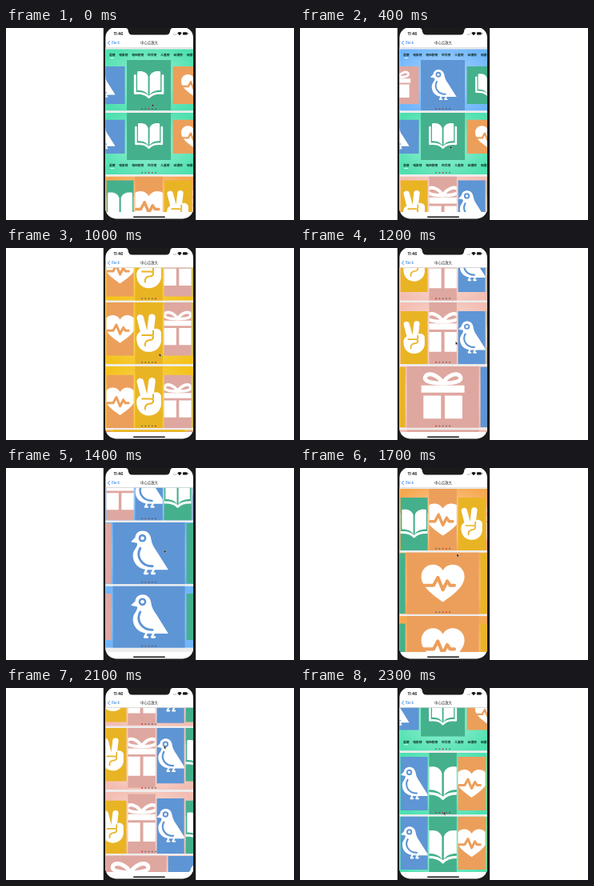
Animation, 360 px wide and 240 px high, one loop 2.4 s. Source, as an HTML page:

```html
<!DOCTYPE html>
<html lang="zh">
<head>
<meta charset="utf-8">
<title>中心点放大</title>
<style>
  html, body { margin: 0; width: 100%; height: 100%; overflow: hidden; background: #fff; }
  #stage { display: block; width: 360px; height: 240px; }
  text { font-family: "Noto Sans CJK SC", "Noto Sans CJK", "Inter", sans-serif; }
  .latin { font-family: "Inter", "Roboto", sans-serif; }
  .ink { fill: #fff; }
  .line { fill: none; stroke: #fff; stroke-linecap: round; stroke-linejoin: round; }
</style>
</head>
<body>
<svg id="stage" viewBox="0 0 360 240">
  <defs>
    <clipPath id="screen"><rect x="124.4" y="-1" width="109.6" height="239.4" rx="13"/></clipPath>
    <clipPath id="view"><rect x="124" y="24.5" width="110.4" height="205.5"/></clipPath>
    <clipPath id="cell"><rect width="110.4" height="77.2"/></clipPath>

    <g id="art0">
      <path class="ink" d="M27 23C37 21 46 24 48.4 33V69C44 62 36 60 27 60Z"/>
      <path class="ink" d="M73 23C63 21 54 24 51.6 33V69C56 62 64 60 73 60Z"/>
      <path class="line" stroke-width="4.5" d="M22.5 31V66C35 65 44 67 50 74C56 67 65 65 77.5 66V31"/>
    </g>
    <g id="art1">
      <path class="ink" d="M50 76C42 70 20 57 20 41C20 23 42 18 50 32C58 18 80 23 80 41C80 57 58 70 50 76Z"/>
      <path class="line" style="stroke:#ec9f5b" stroke-width="4.6" d="M18 53H37L43 42L50 59L56 47L60 53H66"/>
    </g>
    <g id="art2">
      <path class="line" stroke-width="11" d="M36 25L43 52M55 24L52 50"/>
      <path class="ink" d="M30 58C30 49 37 46 45 46H56C57 40 69 41 70 49V61C70 72 61 80 50 80C38 80 30 71 30 58Z"/>
      <path class="line" style="stroke:#e9b424" stroke-width="2.6" d="M39 53H52C60 53 58 61 50 61C45 62 43 66 44 70M57 46V52"/>
    </g>
    <g id="art3">
      <path class="line" stroke-width="5.5" d="M50 31C44 20 31 15 26 21C22 28 33 31 50 31C67 31 78 28 74 21C69 15 56 20 50 31"/>
      <path class="ink" d="M20 34H80V44H20ZM23 48H47.4V80H23ZM52.6 48H77V80H52.6Z"/>
    </g>
    <g id="art4">
      <path class="ink" d="M25 34L31 28C32 16 51 15 53 30C54 37 57 42 60 46L77 73H51C35 73 27 63 28 51C29 45 34 42 34 36Z"/>
      <circle cx="41" cy="29" r="5.4" fill="#5e95d4"/>
      <circle class="ink" cx="41" cy="29" r="2.5"/>
      <path class="line" style="stroke:#5e95d4" stroke-width="3.2" d="M38 43C32 54 39 68 55 68"/>
      <path class="line" stroke-width="3" d="M47 72L44 78H48M57 72L54 78H58"/>
    </g>
  </defs>

  <rect width="360" height="240" fill="#fff"/>
  <path d="M121.8 0H237.2V240H121.8Z" fill="#1b1b1c"/>
  <g clip-path="url(#screen)">
    <rect x="124" y="-1" width="111" height="241" fill="#fff"/>
    <g clip-path="url(#view)">
      <rect x="124" y="24" width="111" height="207" fill="#ededed"/>
      <g id="list"></g>
    </g>
    <rect x="124" y="24" width="111" height=".6" fill="#d4d4d4"/>
    <text class="latin" x="134.4" y="8.9" font-size="4.8" font-weight="600">11:46</text>
    <path d="M129.8 16.1L127.5 18.6L129.8 21.1" fill="none" stroke="#2a7de8" stroke-width=".9"/>
    <text class="latin" x="132" y="20.2" font-size="4.3" fill="#2a7de8">Back</text>
    <text x="179" y="20.2" font-size="4.4" font-weight="500" text-anchor="middle" fill="#222">中心点放大</text>
    <g fill="#111">
      <circle cx="209.5" cy="8" r=".4"/><circle cx="211" cy="8" r=".4"/><circle cx="212.5" cy="8" r=".4"/>
      <path d="M214.2 6.2Q217 4 219.8 6.2L217 9.2Z"/>
      <rect x="221" y="5.2" width="5.6" height="3.4" rx=".9"/>
      <rect x="227" y="6.2" width=".6" height="1.4"/>
    </g>
    <rect x="159" y="235.4" width="40" height="1.6" rx=".8" fill="#111"/>
  </g>
  <path d="M150 0H208Q205.5 .3 205.3 3Q205 8.6 200 8.6H158Q153 8.6 152.7 3Q152.5 .3 150 0Z" fill="#1b1b1c"/>
  <path id="cursor" d="M0 0V4.2L1 3.3L1.7 4.8L2.4 4.5L1.8 3.1H3Z" fill="#111" stroke="#fff" stroke-width=".3"/>
</svg>
<script>
const NS = "http://www.w3.org/2000/svg";
const STEP = 100, STEPS = 24, TOP = 26.3, PITCH = 79.6, MID = 54.6;
// book, heart, hand, gift, bird
const CARD = ["#45b08c", "#ec9f5b", "#e9b424", "#dea7a0", "#5e95d4"];
const BACK = ["#4fe0b0", "#f6a750", "#f5c21c", "#f3bdb2", "#6fb5fa"];
const GLOW = ["#84ecca", "#fbc891", "#f8d451", "#f9d9d2", "#9bcdfc"];
const TABS = [["总榜", 5], ["电影榜", 17.3], ["电视剧榜", 33.2], ["综合榜", 53],
  ["儿童榜", 69.3], ["动漫榜", 85.5], ["明星榜", 102]];

// pitch, then [width, top, bottom] of the middle and of the side cards
const ROWS = [
  { pitch: 56, mid: [55, 13.7, 76.7], side: [52, 21.7, 68.7], tabs: 9.2 },
  { pitch: 56, mid: [55, 0, 59], side: [52, 8.8, 51], tabs: 67.4 },
  { pitch: 36, mid: [34.4, 0, 77.2], side: [34, 5, 72] },
  { pitch: 36, mid: [34.4, 0, 77.2], side: [34, 0, 66.5] },
  { pitch: 36, mid: [34.4, 0, 77.2], side: [34, 11, 77.2] },
  { pitch: 92, mid: [90, 0, 77.2], side: [90, 1, 76.4] },
  { pitch: 92, mid: [90, 0, 77.2], side: [90, 9.5, 67.5] }
];

// page shown by the auto-advancing rows at each step
const PAGES = [1, 1, 2, 2, 3, 4, 4, 5, 5, 5, 7, 7, 8, 8, 9, 10, 10, 11, 12, 12, 13, 13.25, 14, 15];
const SCROLL = [[0, 0], [5, 0], [7, 105], [9, 105], [10, 197], [14, 356.3], [15, 356.3],
  [17, 318.8], [21, 215], [23, 104.5], [24, 0]];
const CURSOR_X = [[0, 182.5], [4, 187.5], [7, 190], [9, 190], [10, 191.5], [14, 197.5], [17, 196], [21, 197.5], [23, 179.5], [24, 182.5]];
const CURSOR_Y = [[0, 94.5], [4, 147], [7, 140], [9, 140], [10, 131.5], [14, 102], [17, 107], [21, 72], [23, 154.5], [24, 94.5]];

const mix = (a, b, k) => a + (b - a) * k;
const wrap = (v, n) => ((v % n) + n) % n;

function along(keys, t) {
  const i = keys.findIndex(k => k[0] > t);
  const [t0, a] = keys[i - 1], [t1, b] = keys[i];
  return mix(a, b, (t - t0) / (t1 - t0));
}

function set(node, attrs) {
  for (const k in attrs) node.setAttribute(k, attrs[k]);
  return node;
}

function add(parent, tag, attrs) {
  return parent.appendChild(set(document.createElementNS(NS, tag), attrs));
}

const list = document.getElementById("list");
const cursor = document.getElementById("cursor");
const defs = document.querySelector("defs");

BACK.forEach((color, i) => {
  const g = add(defs, "radialGradient", { id: "back" + i, r: .62 });
  add(g, "stop", { offset: .35, "stop-color": GLOW[i] });
  add(g, "stop", { offset: 1, "stop-color": color });
});

function addTabs(cell, y) {
  TABS.forEach(([name, x], i) => {
    add(cell, "text", { x, y, "font-size": 3.75, "font-weight": 700, fill: i ? "#102b24" : "#0a1512" })
      .textContent = name;
  });
  add(cell, "rect", { x: 6.3, y: y + 1.6, width: 5, height: .8, fill: "#fff" });
}

function buildRow(row, n) {
  const cell = add(list, "g", {
    transform: `translate(124 ${TOP + n * PITCH})`, "clip-path": "url(#cell)"
  });
  row.back = add(cell, "rect", { width: 110.4, height: 77.2 });
  row.cards = CARD.map((color, i) => {
    const card = add(cell, "svg", { viewBox: "0 0 100 100", preserveAspectRatio: "xMidYMid slice" });
    add(card, "rect", { x: -100, y: -100, width: 300, height: 300, fill: color });
    add(card, "use", { href: "#art" + i });
    return card;
  });
  if (row.tabs) addTabs(cell, row.tabs);
  row.dots = CARD.map((_, i) =>
    add(cell, "circle", { cx: MID + (i - 2) * 4.25, cy: 74.8, r: 1 }));
}

function drawRow(row, page) {
  const now = wrap(Math.round(page), 5);
  set(row.back, { fill: `url(#back${now})` });
  row.cards.forEach((card, i) => {
    const d = wrap(i - page + 2.5, 5) - 2.5;
    const k = Math.min(Math.abs(d), 1);
    const [w, top, bottom] = row.mid.map((v, j) => mix(v, row.side[j], k));
    set(card, { x: MID + d * row.pitch - w / 2, y: top, width: w, height: bottom - top });
  });
  row.dots.forEach((dot, i) =>
    set(dot, { fill: i === (now + 2) % 5 ? "#e2382c" : "rgba(70,75,80,.6)" }));
}

function pageOf(n, step) {
  if (step > 4 || n > 1) return PAGES[step];
  return n === 0 && step > 1 ? -1 : 0;
}

function draw(step) {
  set(list, { transform: `translate(0 ${-along(SCROLL, step)})` });
  set(cursor, { transform: `translate(${along(CURSOR_X, step)} ${along(CURSOR_Y, step)})` });
  ROWS.forEach((row, n) => drawRow(row, pageOf(n, step)));
}

ROWS.forEach(buildRow);
draw(0);

let start, last = 0;
function tick(now) {
  start ??= now;
  const step = Math.floor((now - start) / STEP) % STEPS;
  if (step !== last) draw(last = step);
  requestAnimationFrame(tick);
}
requestAnimationFrame(tick);
</script>
</body>
</html>
```
